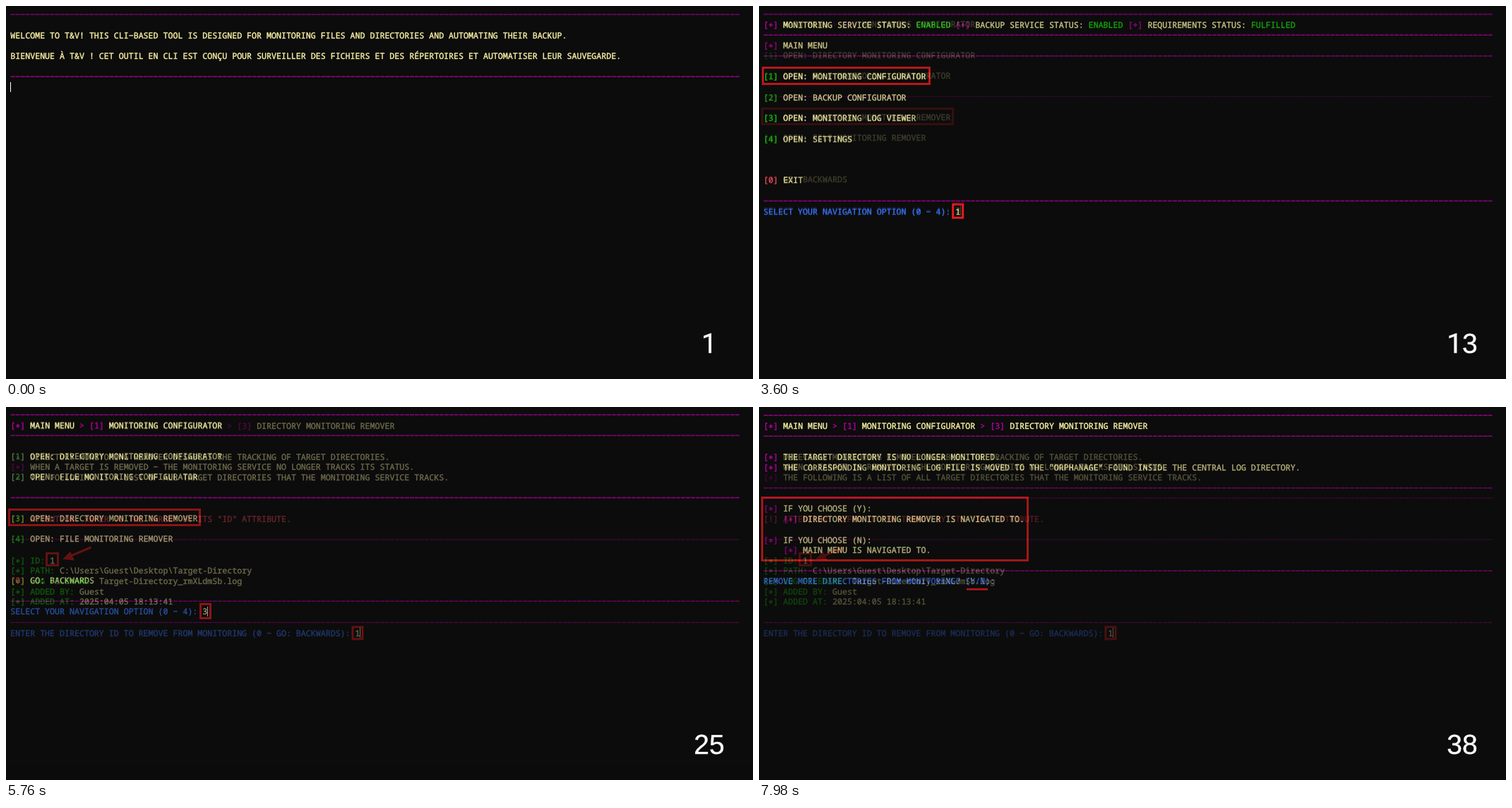
Write an HTML page that moves like this. It is 1058 px wide and 529 px high and loops after 8000 ms.

```html
<!DOCTYPE html>
<html lang="en">
<head>
<meta charset="utf-8">
<style>
html, body { margin: 0; width: 100%; height: 100%; overflow: hidden; background: #0c0c0c; }
svg { display: block; }
text { font: 500 11.634px "Noto Sans Mono", "DejaVu Sans Mono", monospace; white-space: pre; text-rendering: geometricPrecision; font-variant-ligatures: none; stroke-width: .4; }
#count { font: 39px "Liberation Sans", Arial, sans-serif; fill: #fff; stroke: #fff; text-anchor: middle; }
#count tspan { font-family: Roboto, sans-serif; }
.mark { fill: none; stroke: #e31b1e; stroke-width: 3; }
</style>
</head>
<body>
<svg id="stage" width="1058" height="529" viewBox="0 0 1058 529"></svg>
<script>
const COLORS = { p: '#b4009e', y: '#f9f1a5', g: '#16c60c', b: '#3b78ff', r: '#e74856' };
const CELL = 6.98, ROW = 14.7, LEFT = 6.3;
const STARTS = [1500, 3540, 5580, 7620], STEP = 60, LOOP = 8000;

const escape = s => s.replace(/&/g, '&amp;').replace(/</g, '&lt;').replace(/>/g, '&gt;');
const box = (x1, y1, x2, y2) =>
  `<rect class="mark" x="${x1 + 1.5}" y="${y1 + 1.5}" width="${x2 - x1 - 3}" height="${y2 - y1 - 3}"/>`;
const cursor = (x, y) => `<rect x="${x}" y="${y}" width="1" height="14" fill="#fff"/>`;

// "=" is a rule; "~" plus a letter switches the text colour.
function line(src, row, top) {
  const y = top + row * ROW;
  if (src === '=')
    return `<path d="M${LEFT + .3} ${y}h${148 * CELL - 1}" stroke="${COLORS.p}" stroke-width="1.2" stroke-dasharray="6.1 ${CELL - 6.1}"/>`;
  const spans = src.split('~').slice(1).map(s => {
    const color = COLORS[s[0]];
    return `<tspan fill="${color}" stroke="${color}">${escape(s.slice(1))}</tspan>`;
  }).join('');
  return spans && `<text x="${LEFT}" y="${y + 4.2}">${spans}</text>`;
}

const screen = (top, rows, extras) =>
  `<g class="screen"><rect width="1058" height="529" fill="#0c0c0c"/>` +
  rows.map((src, i) => line(src, i, top)).join('') + extras + '</g>';

const item = (n, label) => `~${n ? 'g' : 'r'}[${n}] ~y${label}`;
const note = label => `~p[∗] ~y${label}`;
const field = (name, value) => `~g[∗] ${name}: ~y${value}`;
const select = n => `~bSELECT YOUR NAVIGATION OPTION (0 − 4): ~y${n}`;
const service = (name, state) => `~p[+] ~y${name} STATUS: ~g${state} `;
const config = note('MAIN MENU ~p> [1] ~yMONITORING CONFIGURATOR');
const remover = config + ' ~p> [3] ~yDIRECTORY MONITORING REMOVER';

const screens = [
  screen(12, [
    '=', '',
    '~yWELCOME TO T&V! THIS CLI−BASED TOOL IS DESIGNED FOR MONITORING FILES AND DIRECTORIES AND AUTOMATING THEIR BACKUP.', '',
    '~yBIENVENUE À T&V ! CET OUTIL EN CLI EST CONÇU POUR SURVEILLER DES FICHIERS ET DES RÉPERTOIRES ET AUTOMATISER LEUR SAUVEGARDE.', '',
    '='
  ], cursor(6, 108)),

  screen(12, [
    '=',
    service('MONITORING SERVICE', 'ENABLED') + service('BACKUP SERVICE', 'ENABLED') + service('REQUIREMENTS', 'FULFILLED'),
    '=', note('MAIN MENU'), '=', '',
    item(1, 'OPEN: MONITORING CONFIGURATOR'), '',
    item(2, 'OPEN: BACKUP CONFIGURATOR'), '',
    item(3, 'OPEN: MONITORING LOG VIEWER'), '',
    item(4, 'OPEN: SETTINGS'), '', '', '',
    item(0, 'EXIT'), '', '=', select(1)
  ], box(4, 86, 243, 112) + box(273, 280, 290, 302)),

  screen(10.7, [
    '=', config, '=', '',
    item(1, 'OPEN: DIRECTORY MONITORING CONFIGURATOR'), '',
    item(2, 'OPEN: FILE MONITORING CONFIGURATOR'), '', '=', '',
    item(3, 'OPEN: DIRECTORY MONITORING REMOVER'), '',
    item(4, 'OPEN: FILE MONITORING REMOVER'), '', '', '',
    item(0, 'GO: BACKWARDS'), '', '=', select(3)
  ], box(3, 144, 276, 169) + box(274, 278, 291, 301) + cursor(285, 283)),

  screen(11.6, [
    '=', remover, '=', '',
    note('DIRECTORY MONITORING REMOVER DISABLES THE TRACKING OF TARGET DIRECTORIES.'),
    note('WHEN A TARGET IS REMOVED − THE MONITORING SERVICE NO LONGER TRACKS ITS STATUS.'),
    note('THE FOLLOWING IS A LIST OF ALL TARGET DIRECTORIES THAT THE MONITORING SERVICE TRACKS.'), '', '=', '',
    '~r[!] ATTENTION: REFER TO THE TARGET BY ITS "ID" ATTRIBUTE.', '', '=', '',
    field('ID', '1'),
    field('PATH', 'C:\\Users\\Guest\\Desktop\\Target-Directory'),
    field('LOG FILENAME', 'Target-Directory_rmXLdmSb.log'),
    field('ADDED BY', 'Guest'),
    field('ADDED AT', '2025:04:05 18:13:41'), '', '=',
    '~bENTER THE DIRECTORY ID TO REMOVE FROM MONITORING (0 − GO: BACKWARDS): ~y1'
  ], box(56, 206, 75, 226) + box(489.5, 310.5, 506.5, 330.5) + cursor(501, 313) +
    '<path class="mark" d="M120.5 199L92 211"/><path d="M80 216L91 205L97 217.5Z" fill="#e31b1e"/>'),

  screen(11.9, [
    '=', remover, '=', '',
    note('THE TARGET DIRECTORY IS NO LONGER MONITORED.'),
    note('THE CORRESPONDING MONITORING LOG FILE IS MOVED TO THE "ORPHANAGE" FOUND INSIDE THE CENTRAL LOG DIRECTORY.'), '', '=', '',
    note('IF YOU CHOOSE (Y):'),
    '~p    [∗] ~yDIRECTORY MONITORING REMOVER IS NAVIGATED TO.', '',
    note('IF YOU CHOOSE (N):'),
    '~p    [∗] ~yMAIN MENU IS NAVIGATED TO.', '', '=',
    '~bREMOVE MORE DIRECTORIES FROM MONITORING? (Y/N):'
  ], box(3, 127, 382, 219) + '<path class="mark" d="M294 258.5H324"/>')
];

const stage = document.getElementById('stage');
stage.innerHTML = screens.join('') + '<text id="count" x="996" y="492.3"></text>';
const layers = stage.querySelectorAll('.screen');
const count = document.getElementById('count');

function draw() {
  const t = performance.now() % LOOP;
  const current = STARTS.filter(s => t >= s).length;
  const step = current ? Math.min(10, Math.floor((t - STARTS[current - 1]) / STEP) + 1) : 10;
  layers.forEach((g, i) => g.setAttribute('opacity', i < current ? 1 : i === current ? step / 10 : 0));
  // The counter's "1" has no foot, so it takes another face.
  const n = current ? 10 * current - 9 + step : 1;
  count.innerHTML = String(n).replace(/1/g, '<tspan>1</tspan>');
  requestAnimationFrame(draw);
}
draw();
</script>
</body>
</html>
```
